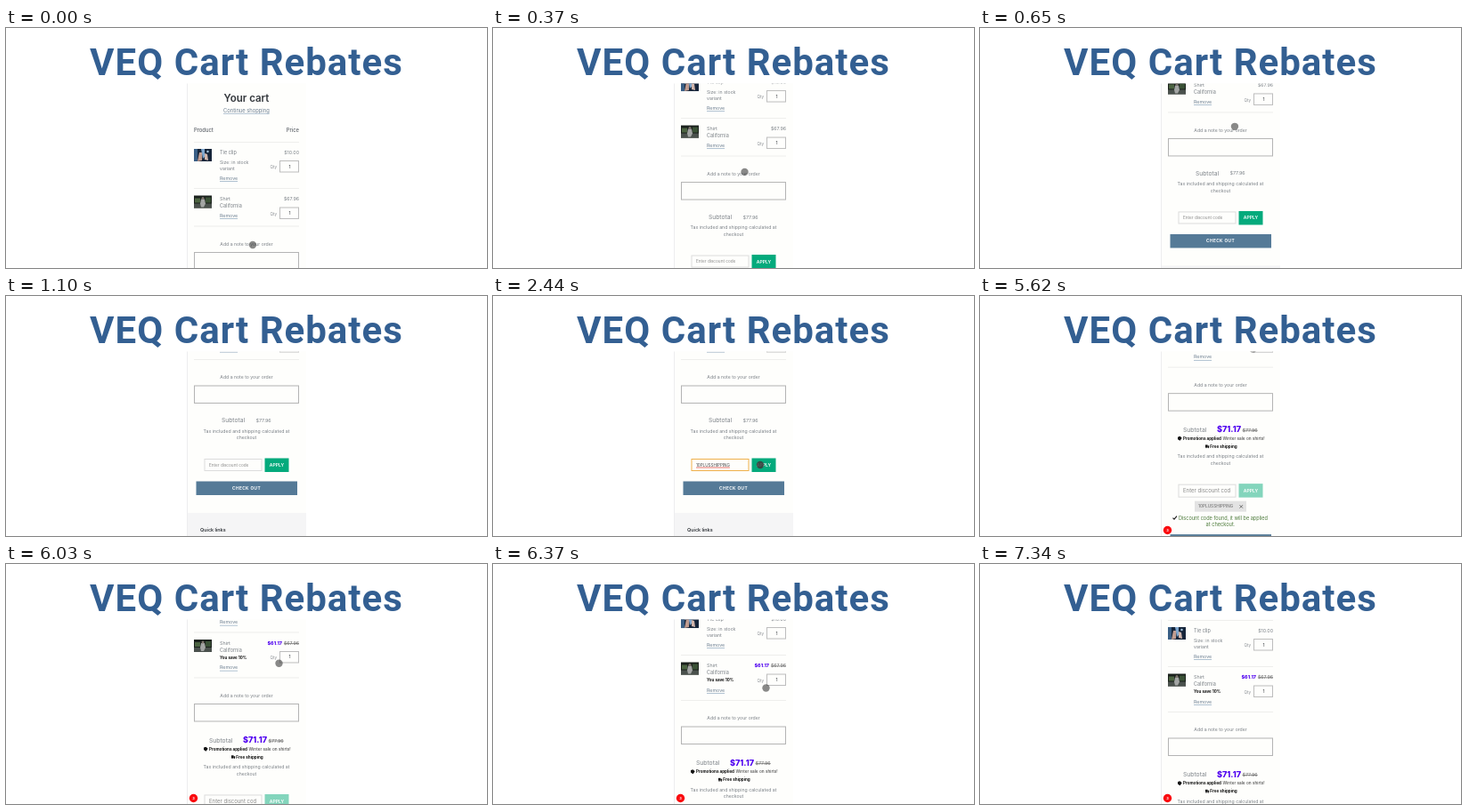
An HTML page with a canvas for the animation above (8060 ms loop, 540 by 270 pixels).

```html
<!DOCTYPE html>
<html lang="en">
<head>
<meta charset="utf-8">
<title>VEQ Cart Rebates</title>
<style>
  html, body { margin: 0; width: 100%; height: 100%; overflow: hidden; background: #fff; }
  canvas { display: block; width: 540px; height: 270px; }
</style>
</head>
<body>
<canvas id="stage"></canvas>
<script>
const LOOP = 8060, END = 151.5;
const canvas = document.getElementById('stage');
const ctx = canvas.getContext('2d');
const dpr = window.devicePixelRatio || 1;
canvas.width = 540 * dpr;
canvas.height = 270 * dpr;

const PAPER = '#fefefc', GREY = '#7b8087', INK = '#33373c', PURPLE = '#4f00f0', GREEN = '#4c7a3a';
const clamp = v => Math.max(0, Math.min(1, v));
const part = (t, a, b) => clamp((t - a) / (b - a));
const easeOut = (p, power) => 1 - (1 - p) ** power;
const smooth = p => p * p * (3 - 2 * p);
const mix = (a, b, p) => a + (b - a) * p;

function text(str, x, y, size, color = GREY, weight = 400, align = 'left') {
  ctx.font = `${weight} ${size}px Inter, sans-serif`;
  ctx.fillStyle = color;
  ctx.textAlign = align;
  ctx.textBaseline = 'middle';
  ctx.fillText(str, x, y);
  return ctx.measureText(str).width;
}
function fill(x, y, w, h, color) {
  ctx.fillStyle = color;
  ctx.fillRect(x, y, w, h);
}
function frame(x, y, w, h, color) {
  fill(x, y, w, h, PAPER);
  ctx.strokeStyle = color;
  ctx.lineWidth = 1;
  ctx.strokeRect(x + .5, y + .5, w - 1, h - 1);
}
function dot(x, y, r, color) {
  ctx.fillStyle = color;
  ctx.beginPath();
  ctx.arc(x, y, r, 0, 7);
  ctx.fill();
}
function shape(color, ...pts) {
  ctx.fillStyle = color;
  ctx.beginPath();
  for (let i = 0; i < pts.length; i += 2) ctx.lineTo(pts[i], pts[i + 1]);
  ctx.fill();
}
function link(str, x, y, size) {
  const w = text(str, x, y, size, '#6d7f91');
  fill(x, y + 3.1, w, .7, '#8fa8be');
}
function struck(str, x, y, size, align) {
  const w = text(str, x, y, size, '#666', 400, align);
  fill(align === 'right' ? x - w : x, y - .3, w, .7, '#666');
}
const center = (str, y, size, color, weight) => text(str, 270, y, size, color, weight, 'center');
const rule = y => fill(211, y, 118, 1, '#eeeeec');

function quantity(y) {
  text('Qty', 296.5, y + 7.9, 4.5, '#8b8f95');
  frame(307, y, 22, 13.5, '#bdbdbd');
  text('1', 318.5, y + 7, 5, INK, 400, 'center');
}
function tiePhoto(x, y) {
  fill(x, y, 20, 14, '#16253a');
  fill(x, y, 4, 14, '#3a5f86');
  shape('#c09c90', x + 4, y + 14, x + 6, y + 4, x + 9, y + 4, x + 9, y + 13);
  shape('#7fa6cd', x + 8, y, x + 12, y, x + 12, y + 9, x + 10, y + 11);
  shape('#d2b6ac', x + 12, y + 5, x + 15, y + 6, x + 16, y + 13, x + 12, y + 12);
  dot(x + 15.5, y + 3, 1.2, '#a9c8e2');
}
function shirtPhoto(x, y) {
  fill(x, y, 20, 14, '#1b211d');
  fill(x, y + 9, 20, 5, '#4a514d');
  fill(x + 1, y + 3, 6, 5, '#4c6442');
  fill(x + 13, y + 2, 6, 6, '#3a5136');
  shape('#a3a5a4', x + 8, y + 4, x + 12, y + 4, x + 13, y + 9, x + 11, y + 13, x + 8, y + 13, x + 7, y + 9);
  dot(x + 10, y + 3, 1.5, '#7d746c');
}

function items(promo) {
  center('Your cart', 79.3, 11.5, INK, 600);
  link('Continue shopping', 244, 92.8, 5.8);
  text('Product', 211, 115, 5.8, '#5d6269', 500);
  text('Price', 329, 115, 5.8, '#5d6269', 500, 'right');
  rule(128);

  tiePhoto(211, 136);
  text('Tie clip', 240, 140.7, 5.5);
  text('$10.00', 329, 140.7, 5.3, GREY, 400, 'right');
  text('Size: in stock', 240, 151.4, 5.2);
  text('variant', 240, 158.9, 5.2);
  link('Remove', 240, 169.2, 5.3);
  quantity(149);
  rule(180);

  shirtPhoto(211, 188.5);
  text('Shirt', 240, 192.8, 5.4);
  text('California', 240, 200.7, 5.5);
  if (promo) {
    text('$61.17', 310, 192.8, 5.4, PURPLE, 800, 'right');
    struck('$67.96', 329, 192.8, 5.3, 'right');
    text('You save 10%', 240, 209, 4.5, '#111', 700);
  } else {
    text('$67.96', 329, 192.8, 5.3, GREY, 400, 'right');
  }
  link('Remove', 240, promo ? 220.2 : 211.2, 5.3);
  quantity(201.5);
  rule(promo ? 231 : 222.5);
}

function promotions() {
  text('Subtotal', 228, 302.3, 6.75);
  text('$71.17', 266, 301.9, 9.1, PURPLE, 800);
  struck('$77.96', 294.5, 302.5, 5.4);
  shape('#111', 222, 310, 224.5, 309.2, 226.7, 311.2, 224.5, 314.2, 222, 312.5);
  text('Promotions applied', 228, 312, 4.55, '#111', 700);
  text('Winter sale on shirts!', 272.5, 312, 4.75, '#333');
  fill(253, 318.8, 2.6, 2.8, '#111');
  fill(255.6, 319.7, 1.6, 1.9, '#111');
  dot(254, 321.9, .7, '#111');
  dot(256.3, 321.9, .7, '#111');
  text('Free shipping', 258.3, 320.8, 4.6, '#111', 700);
}

function applied() {
  fill(241, 382, 58, 12, '#e3e3e3');
  text('10PLUSSHIPPING', 245, 388.3, 4.7, '#777', 500);
  ctx.strokeStyle = '#555';
  ctx.lineWidth = .8;
  ctx.beginPath();
  ctx.moveTo(291.5, 386.5); ctx.lineTo(295, 390);
  ctx.moveTo(295, 386.5); ctx.lineTo(291.5, 390);
  ctx.stroke();
  ctx.strokeStyle = '#222';
  ctx.lineWidth = 1.2;
  ctx.beginPath();
  ctx.moveTo(216.5, 401); ctx.lineTo(218, 402.5); ctx.lineTo(221, 399);
  ctx.stroke();
  text('Discount code found, it will be applied', 223, 401.2, 5.55, GREEN);
  center('at checkout.', 408.7, 5.65, GREEN);
}

function search(t) {
  const a = t / 1000 * 2 * Math.PI;
  ctx.strokeStyle = '#666';
  ctx.lineWidth = .8;
  ctx.beginPath();
  ctx.arc(254, 356.7, 2.2, a, a + 5);
  ctx.stroke();
  text('Searching...', 259, 357, 5.35);
}

function coupon(t, promo, y) {
  const focus = t >= 1550 && t < 2750;
  frame(222.5, y + .5, 65, promo ? 15 : 14, focus ? '#efb04a' : '#dcdcdc');
  const mid = y + (promo ? 8.3 : 7.8);
  if (promo) {
    text('Enter discount cod', 228, mid, 6, '#8a8a8a');
  } else if (t < 1875) {
    text('Enter discount code', 228, mid, 4.7, '#8a8a8a');
  } else {
    const w = text('10PLUSSHIPPING', 228, mid, 4.55, '#444');
    if (focus) fill(228, mid + 2.3, w, .8, '#e0524a');
  }
  const p = part(t, 2750, 2900);
  fill(290.5, y, 27, 15.5, `rgb(${mix(4, 131, p)},${mix(170, 213, p)},${mix(124, 188, p)})`);
  text('APPLY', 304, y + 8, 5.1, '#fff', 600, 'center');
}

function page(t) {
  const promo = t >= 4440, searching = t >= 2750 && !promo;
  const noteShift = promo ? 8.5 : 0, shift = promo ? 28.5 : 0;
  items(promo);
  center('Add a note to your order', 243.2 + noteShift, 5.15);
  frame(211, 252 + noteShift, 118, 20.5, '#b4b4b4');
  if (promo) promotions();
  else {
    text('Subtotal', 242, 291.7, 6.7);
    text('$77.96', 280.5, 291.9, 5.4);
  }
  center('Tax included and shipping calculated at', 303.5 + shift, 5.2);
  center('checkout', 311 + shift, 5.2);
  coupon(t, promo, 334 + shift);
  if (promo) applied();
  if (searching) search(t);

  const extra = promo ? 59.5 : searching ? 8 : 0;
  fill(213.5, 360 + extra, 113.5, 15.5, '#557a97');
  ctx.letterSpacing = '.4px';
  center('CHECK OUT', 368 + extra, 4.75, '#fff', 700);
  ctx.letterSpacing = '0px';
  fill(204, 395.5 + extra, 133, 120, '#f5f5f6');
  text('Quick links', 218, 415 + extra, 5.4, INK, 600);
}

// Page offset: one flick up, later one flick back.
function scrollAt(t) {
  return END * easeOut(part(t, 100, 1100), 2.33) - 86.5 * easeOut(part(t, 5620, 6820), 1.93);
}

// Touch pointer: x, y, opacity
function pointerAt(t) {
  const s = scrollAt(t);
  if (t < 1200) return [277 + s * .07, 244 - s * 1.04, .6 * (1 - part(t, 850, 1050))];
  if (t < 4960) {
    const p = smooth(part(t, 2220, 2440));
    const press = t >= 2440 && t < 2850 ? .25 : 0;
    return [mix(267.5, 300, p), mix(192.5, 190, p), .6 * part(t, 1210, 1370) + press];
  }
  if (t < 5620) {
    const p = smooth(part(t, 4930, 5340));
    return [mix(300, 306.5, p), mix(190, 59.5, p), .6];
  }
  return [306.5, 59.5 + Math.min(87, (END - s) * 1.088), .6 * (1 - part(t, 7240, 7340))];
}

function draw(t) {
  ctx.setTransform(dpr, 0, 0, dpr, 0, 0);
  fill(0, 0, 540, 270, '#fff');
  ctx.font = '700 42px Roboto, sans-serif';
  ctx.letterSpacing = '1px';
  ctx.fillStyle = '#335f92';
  ctx.textAlign = 'center';
  ctx.textBaseline = 'alphabetic';
  ctx.fillText('VEQ Cart Rebates', 270, 52.5);
  ctx.letterSpacing = '0px';

  ctx.save();
  ctx.beginPath();
  ctx.rect(203, 62.5, 134, 207.5);
  ctx.clip();
  fill(203, 62, 134, 208, PAPER);
  ctx.save();
  ctx.translate(0, -scrollAt(t));
  page(t);
  ctx.restore();
  fill(203, 62, 1, 208, '#ededef');
  if (t >= 4475) {
    dot(210.5, 263.5, 4.7, '#fa0a0e');
    text('3', 210.5, 263.7, 4, '#fff', 700, 'center');
  }
  const [x, y, alpha] = pointerAt(t);
  dot(x, y, 4.2, `rgba(60,60,60,${alpha})`);
  ctx.restore();
}

const start = performance.now();
function tick() {
  draw((performance.now() - start) % LOOP);
  requestAnimationFrame(tick);
}
tick();
</script>
</body>
</html>
```
